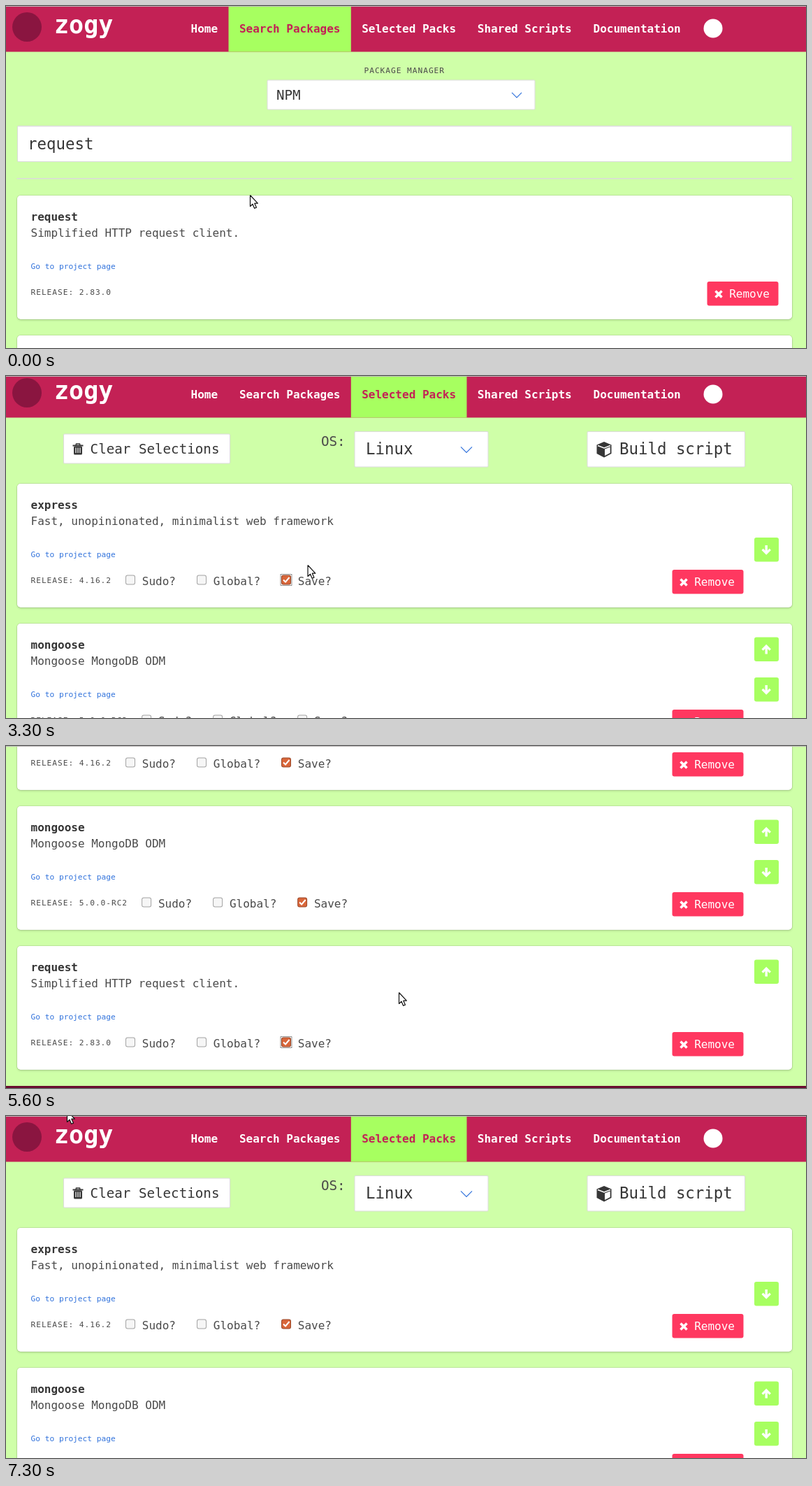
These frames come from a looping animation (1145x489 px, 7.6 s). An HTML page with a canvas:

```html
<!DOCTYPE html>
<html lang="en">
<head>
<meta charset="utf-8">
<title>Package picker</title>
<style>
html, body { margin: 0; width: 100%; height: 100%; overflow: hidden; }
canvas { display: block; }
</style>
</head>
<body>
<canvas id="stage" width="1145" height="489"></canvas>
<script>
const W = 1145, H = 489, LOOP = 7600, STEP = 100;
const ctx = document.getElementById('stage').getContext('2d');
const CRIMSON = '#c32155', LIME = '#a7ff60', PALE = '#cfffa8', DARK = '#363636', GREY = '#4a4a4a', BLUE = '#3273dc';

// [time, x, y]
const POINTER = [
  [0, 349, 270], [400, 349, 270], [1000, 574, 40], [1200, 574, 40],
  [2000, 404, 275], [2100, 404, 275], [2300, 401.5, 283], [2400, 400, 286],
  [2600, 432, 276], [2800, 432, 276], [3300, 431.5, 270], [3600, 433, 270],
  [3900, 431, 270], [4400, 432, 416], [4500, 432, 416], [4800, 444, 324],
  [4900, 444, 324], [5600, 562, 352], [5900, 567, 338], [6300, 656, 328],
  [6500, 656, 328], [7100, 59, 22], [7300, 87, -8]
];
// [time, offset]
const SCROLL = [
  [0, 0], [3200, 0], [3300, 6], [3400, 70], [3500, 158], [3600, 228],
  [3900, 228], [4100, 274], [5600, 274], [5700, 228], [5800, 125], [5900, 43], [6100, 0]
];
const OPENED = 1300;
const PACKS = [
  { name: 'express', about: 'Fast, unopinionated, minimalist web framework', release: '4.16.2', saved: 2400 },
  { name: 'mongoose', about: 'Mongoose MongoDB ODM', release: '5.0.0-RC2', saved: 3800 },
  { name: 'request', about: 'Simplified HTTP request client.', release: '2.83.0', saved: 4500 }
];
const MENU = ['Home', 'Search Packages', 'Selected Packs', 'Shared Scripts', 'Documentation'];

let mouse, scroll;

function track(keys, t) {
  const i = keys.findIndex(k => k[0] > t);
  if (i < 0) return keys[keys.length - 1].slice(1);
  const a = keys[i - 1], b = keys[i], u = (t - a[0]) / (b[0] - a[0]);
  return a.slice(1).map((v, n) => v + (b[n + 1] - v) * u);
}

function text(s, x, y, size, color, bold = false, spacing = 0) {
  ctx.font = `${bold ? 'bold ' : ''}${size}px "DejaVu Sans Mono", monospace`;
  ctx.letterSpacing = spacing + 'px';
  ctx.fillStyle = color;
  ctx.fillText(s, x, y);
}

function rect(x, y, w, h, color, r = 0) {
  ctx.fillStyle = color;
  ctx.beginPath();
  ctx.roundRect(x, y, w, h, r);
  ctx.fill();
}

function disc(x, y, r, color) {
  rect(x - r, y - r, 2 * r, 2 * r, color, r);
}

function line(color, width, ...points) {
  ctx.strokeStyle = color;
  ctx.lineWidth = width;
  ctx.beginPath();
  points.forEach(p => ctx.lineTo(...p));
  ctx.stroke();
}

function shape(color, ...points) {
  ctx.fillStyle = color;
  ctx.beginPath();
  points.forEach(p => ctx.lineTo(...p));
  ctx.fill();
}

function over(x, y, w, h) {
  const mx = mouse[0] - x, my = mouse[1] + scroll - y;
  return mx >= 0 && mx < w && my >= 0 && my < h;
}

function field(x, y, w, h) {
  rect(x, y, w, h, over(x, y, w, h) ? '#b5b5b5' : '#dbdbdb', 2);
  rect(x + 1, y + 1, w - 2, h - 2, '#fff', 1);
}

function chevron(x, y, r) {
  line(BLUE, 1.2, [x - r, y - r / 2], [x, y + r / 2], [x + r, y - r / 2]);
}

function nav(active) {
  rect(0, 0, W, 65.5, CRIMSON);
  disc(30, 30, 21, '#8a1540');
  text('zogy', 69, 39, 35, '#fff', true);
  let x = 249.2;
  MENU.forEach((label, i) => {
    const w = label.length * 9.632 + 30.8;
    const lit = i === active || over(x, 0, w, 65.5);
    if (lit) rect(x, 0, w, 65.5, LIME);
    text(label, x + 15.4, 38, 16, lit ? CRIMSON : '#fff', true);
    x += w;
  });
  disc(1012, 32, 13.5, '#fff');
}

function card(y) {
  ctx.save();
  ctx.shadowColor = 'rgba(10,10,10,.12)';
  ctx.shadowBlur = 3;
  ctx.shadowOffsetY = 2;
  rect(16, y, 1109, 176.7, '#fff', 5);
  ctx.restore();
  rect(15, y - 1, 1111, 178.7, 'rgba(10,10,10,.1)', 6);
  rect(16, y, 1109, 176.7, '#fff', 5);
}

function details(pack, y) {
  text(pack.name, 35.5, y + 36, 16, DARK, true);
  text(pack.about, 35.5, y + 59, 16, GREY);
  text('Go to project page', 35.5, y + 105, 11.2, BLUE);
  text('RELEASE: ' + pack.release, 35.5, y + 141.5, 11.2, GREY, false, 0.963);
}

function removeButton(x, y) {
  rect(x, y, 102, 34.6, '#ff3860', 3);
  const cx = x + 16.5, cy = y + 18;
  line('#fff', 3.6, [cx - 4.5, cy - 4.5], [cx + 4.5, cy + 4.5]);
  line('#fff', 3.6, [cx - 4.5, cy + 4.5], [cx + 4.5, cy - 4.5]);
  text('Remove', x + 31.7, y + 23, 16, '#fff');
}

// dir: 1 points down, -1 points up
function arrowButton(y, dir) {
  rect(1071, y, 35, 34.6, LIME, 3);
  const x = 1088.2, cy = y + 17.5;
  line('#fff', 3.4, [x, cy - 6.5 * dir], [x, cy + 4 * dir]);
  line('#fff', 3.2, [x - 5.6, cy - 0.6 * dir], [x, cy + 5 * dir], [x + 5.6, cy - 0.6 * dir]);
}

function checkbox(x, y, label, checked, focused) {
  rect(x - 7, y - 7, 14, 14, checked ? '#9a4a2c' : '#a3a3a3', 3);
  rect(x - 6, y - 6, 12, 12, checked ? '#d9663a' : '#f6f6f6', 2);
  if (checked) line('#fff', 2, [x - 4, y], [x - 1, y + 3], [x + 4.5, y - 3.5]);
  if (focused) {
    ctx.setLineDash([1, 1]);
    line('#333', 1, [x - 7.5, y - 8], [x + 8, y - 8], [x + 8, y + 8], [x - 8, y + 8], [x - 8, y - 8]);
    ctx.setLineDash([]);
  }
  text(label, x + 16.8, y + 7.5, 16, GREY);
}

function searchPage() {
  nav(1);
  text('PACKAGE MANAGER', 512.5, 95.5, 11.2, GREY, false, 0.963);
  field(373.5, 105.5, 384, 43);
  text('NPM', 387, 134, 19.2, DARK);
  chevron(731, 127.3, 7);
  field(16, 171, 1109, 52);
  rect(17, 172, 1107, 1, '#f0f0f0');
  text('request', 31, 205, 22.4, DARK);
  rect(15.5, 246, 1110, 1.6, '#dbdbdb');
  card(271);
  details(PACKS[2], 271);
  removeButton(1003.5, 394);
  card(471);
}

function trash(x, y) {
  rect(x - 7.5, y - 6, 15, 2, DARK);
  line(DARK, 1.5, [x - 3, y - 5.5], [x - 2.5, y - 7.5], [x + 2.5, y - 7.5], [x + 3, y - 5.5]);
  rect(x - 6, y - 4, 12, 12, DARK, 1.5);
  for (const dx of [-3, 0, 3]) rect(x + dx - 0.6, y - 2, 1.2, 7.5, '#fff');
}

function cube(x, y) {
  shape(DARK, [x, y - 11], [x + 10.5, y - 6.5], [x + 10.5, y + 6], [x, y + 11.5], [x - 10.5, y + 6], [x - 10.5, y - 6.5]);
  line('#fff', 1.5, [x - 9, y - 5.5], [x, y - 2], [x + 9, y - 5.5]);
  shape('#fff', [x + 1, y - 0.5], [x + 8.7, y - 3.5], [x + 8.7, y + 5], [x + 1, y + 9]);
}

function selectedPage(t) {
  nav(2);
  field(82, 88.5, 239, 43);
  trash(103, 110.5);
  text('Clear Selections', 120.6, 117, 19.2, DARK);
  text('OS:', 451, 106, 19.2, GREY);
  field(498.5, 85, 192, 51.5);
  text('Linux', 515, 118, 22.4, DARK);
  chevron(659, 111.3, 8);
  field(831.5, 85, 226.5, 51.5);
  cube(856, 111);
  text('Build script', 878, 118, 22.4, DARK);

  const focus = PACKS.filter(p => t >= p.saved).pop();
  PACKS.forEach((pack, i) => {
    const y = 160 + i * 200, shift = (pack.release.length - 6) * 7.7;
    card(y);
    details(pack, y);
    checkbox(178 + shift, y + 137.5, 'Sudo?');
    checkbox(280 + shift, y + 137.5, 'Global?');
    checkbox(401 + shift, y + 137.5, 'Save?', t >= pack.saved, pack === focus && t < 5800);
    removeButton(953.5, y + 123);
    if (i > 0) arrowButton(y + 19.5, -1);
    if (i < 2) arrowButton(y + 77, 1);
  });
  rect(0, 760, W, 60, '#6a0d30');
}

function pointer(x, y) {
  ctx.save();
  ctx.translate(x, y);
  ctx.lineJoin = 'round';
  const p = [[0.5, 0.5], [0.5, 16.5], [4, 13.2], [6.6, 19.3], [9.4, 18.1], [6.8, 12.2], [11.3, 12.2], [0.5, 0.5]];
  shape('#fff', ...p);
  line('#111', 1.2, ...p);
  ctx.restore();
}

function draw(now) {
  const t = Math.floor(now % LOOP / STEP) * STEP;
  mouse = track(POINTER, t);
  scroll = Math.round(track(SCROLL, t)[0]);
  rect(0, 0, W, H, PALE);
  ctx.save();
  ctx.translate(0, -scroll);
  if (t < OPENED) searchPage();
  else selectedPage(t);
  ctx.restore();
  rect(0, 0, W, 1, '#bdb9b9');
  pointer(...mouse);
}

const start = performance.now();
function frame() {
  draw(performance.now() - start);
  requestAnimationFrame(frame);
}
frame();
</script>
</body>
</html>
```
